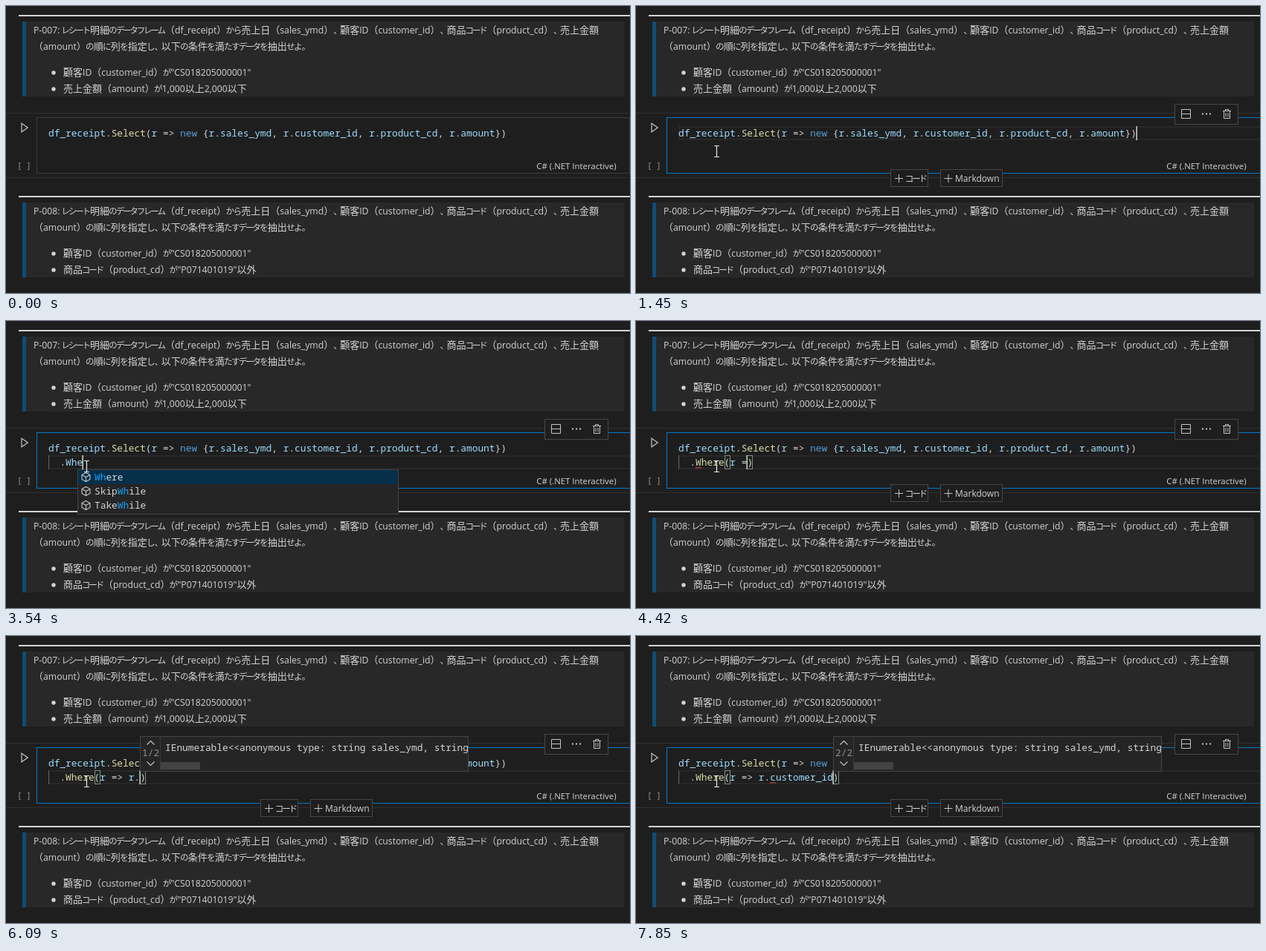
An HTML page that plays this animation: 839 px wide and 387 px high, repeating every 8000 ms.

```html
<!DOCTYPE html>
<html lang="ja">
<head>
<meta charset="utf-8">
<style>
html, body { margin: 0; width: 100%; height: 100%; overflow: hidden; background: #1e1e1e; }
#stage { display: block; }
text { white-space: pre; }
.ui { font: 12.22px "Open Sans", "Noto Sans", sans-serif; fill: #d4d4d4; }
.kanji { font: 13px "Noto Sans CJK JP", "Noto Sans CJK", sans-serif; fill: #d4d4d4; }
.kana { font: 11.6px "Noto Sans CJK JP", "Noto Sans CJK", sans-serif; fill: #d4d4d4; }
.code { font: 500 12.833px "Noto Sans Mono", monospace; fill: #d4d4d4; }
.id { fill: #9cdcfe; }
.fn { fill: #dcdcaa; }
.kw { fill: #569cd6; }
.hit { fill: #18a3ff; }
.icon { fill: none; stroke: #c5c5c5; }
.box { fill: #252526; stroke: #454545; }
.btn { fill: #1e1e1e; stroke: #474747; }
</style>
</head>
<body>
<svg id="stage" width="839" height="387" viewBox="0 0 839 387">
  <g id="notes"></g>
  <path d="M0 144.5H839M0 231.5H839" stroke="#303030"/>
  <rect id="editor" x="41.5" y="150.5" height="75" fill="#1e1e1e"/>
  <path class="icon" d="M21 158.2L29.3 164L21 169.8Z" stroke-width="1.2"/>
  <text class="code" x="15" y="219" style="font-size:10.5px;fill:#9a9a9a">[ ]</text>
  <text class="ui" x="820.5" y="220" text-anchor="end" style="font-size:11.4px">C# (.NET Interactive)</text>
  <rect id="row" x="58" width="790" height="17" fill="none" stroke="#282828" stroke-width="2"/>
  <path id="guide" d="M57.5 181V200" stroke="#606060"/>
  <g id="brackets" fill="#1b251b" stroke="#888"></g>
  <text id="line1" class="code" x="57" y="176"></text>
  <text id="line2" class="code" x="57" y="195"></text>
  <path id="wave" fill="none" stroke="#f14c4c" d="M0 199q1 -2.4 2 -1.2t2 0t2 0t2 0"/>
  <rect id="caret" width="1.6" height="19" fill="#c8c8c6"/>
  <g id="insert">
    <rect class="btn" x="342.5" y="220.5" width="50" height="23"/>
    <rect class="btn" x="409.5" y="220.5" width="83" height="23"/>
    <path class="icon" d="M348 232.5H359M353.5 227V238M414.5 232.5H425.5M420 227V238"/>
    <text class="ui" x="429" y="237" style="font-size:12px">Markdown</text>
  </g>
  <g id="tools">
    <rect id="toolBox" class="btn" y="132.5" height="27"/>
    <path id="split" class="icon" d="M733.5 139.5H745.5V151.5H733.5ZM733.5 145.5H745.5"/>
    <path d="M761 145.5h2m3 0h2m3 0h2" stroke="#c5c5c5" stroke-width="2"/>
    <path id="trash" class="icon" d="M789 141.5H800M792.5 141V139.5H796.5V141M790.5 142V151.5H798.5V142M793 144V149.5M796 144V149.5"/>
  </g>
  <g id="list"></g>
  <svg id="tip" y="135" width="442" height="48">
    <rect class="box" x=".5" y=".5" width="441" height="47"/>
    <path d="M27.5 1V47" stroke="#3a3a3a"/>
    <path class="icon" d="M9.5 11.5L14.5 6.5L19.5 11.5M9.5 34.5L14.5 39.5L19.5 34.5" stroke-width="1.2"/>
    <text id="count" class="code" x="3" y="27" style="fill:#909090"></text>
    <text class="code" x="34" y="20">IEnumerable&lt;&lt;anonymous type: string sales_ymd, string</text>
    <rect id="scroll" x="28" y="35" width="53" height="10" fill="#434343"/>
  </svg>
  <g id="mouse">
    <path id="beam" fill="none" stroke="#e8e8e8" stroke-width="1.2" d="M-3.5 -7.5H-1Q0 -7.5 0 -6.5Q0 -7.5 1 -7.5H3.5M0 -6.5V6.5M-3.5 7.5H-1Q0 7.5 0 6.5Q0 7.5 1 7.5H3.5"/>
    <path id="arrow" fill="#fff" stroke="#000" stroke-width=".8" d="M0 0V15L3.5 12L6 17.5L8 16.6L5.7 11.3H10.5Z"/>
  </g>
</svg>
<script>
const LOOP = 8000, CH = 7.7, LEFT = 57;
const $ = id => document.getElementById(id);
const colX = n => LEFT + CH * n;

function add(parent, tag, attrs, text) {
  const el = document.createElementNS("http://www.w3.org/2000/svg", tag);
  for (const k in attrs) el.setAttribute(k, attrs[k]);
  if (text) el.textContent = text;
  return parent.appendChild(el);
}
const show = (id, on) => $(id).setAttribute("display", on ? "inline" : "none");

// Mixed Japanese and Latin line: kanji on a 13px pitch, kana narrower.
function japanese(parent, x, y, line) {
  for (const run of line.match(/[ -~]+|[ぁ-んァ-ヶー、。]+|[^ -~ぁ-んァ-ヶー、。]+/g)) {
    if (/[ -~]/.test(run)) {
      x += add(parent, "text", { class: "ui", x, y }, run).getComputedTextLength();
      continue;
    }
    const kana = /[ぁ-んァ-ヶー、。]/.test(run), xs = [];
    for (const c of run) {
      const w = !kana ? 13 : /[ァ-ヶー]/.test(c) ? 9.3 : /[、。]/.test(c) ? 9 : 10;
      xs.push(kana && !/[、。]/.test(c) ? x + (w - 11.6) / 2 : x);
      x += w;
    }
    add(parent, "text", { class: kana ? "kana" : "kanji", x: xs.join(" "), y }, run);
  }
}

function note(y, id, rule1, rule2) {
  const g = add($("notes"), "g", { transform: `translate(0 ${y})` });
  add(g, "rect", { x: 17, y: 12, width: 822, height: 2, fill: "#d4d4d4" });
  add(g, "rect", { x: 22, y: 21, width: 809, height: 101, fill: "#282828" });
  add(g, "rect", { x: 22, y: 21, width: 5, height: 101, fill: "#0f4c75" });
  japanese(g, 37, 36.5, id + ": レシート明細のデータフレーム（df_receipt）から売上日（sales_ymd）、顧客ID（customer_id）、商品コード（product_cd）、売上金額");
  japanese(g, 37, 58.5, "（amount）の順に列を指定し、以下の条件を満たすデータを抽出せよ。");
  [rule1, rule2].forEach((rule, i) => {
    add(g, "circle", { cx: 64, cy: 90 + 22 * i, r: 2.7, fill: "#d4d4d4" });
    japanese(g, 77, 94 + 22 * i, rule);
  });
}

function paint(el, code) {
  el.textContent = "";
  for (const part of code.match(/\w+(?=\()|\w+|\W+/g) || [])
    add(el, "tspan", { class: part === "new" ? "kw" : /Select|Where/.test(part) ? "fn" : /\w/.test(part) ? "id" : "" }, part);
}

// Typed second line: [time, text left of the caret]; a bracket pair closes itself.
const typed = [
  [0, ""], [1780, "  "], [2530, "  ."], [2750, "  .W"], [3200, "  .Wh"], [3430, "  .Whe"],
  [3545, "  .Wher"], [3660, "  .Where"], [3880, "  .Where("], [4110, "  .Where(r"],
  [4220, "  .Where(r "], [4420, "  .Where(r ="], [4650, "  .Where(r =>"], [4750, "  .Where(r => "],
  [5770, "  .Where(r => r"], [6090, "  .Where(r => r."], [6970, "  .Where(r => r.c"],
  [7190, "  .Where(r => r.customer_id"]
];
// Suggestions: [time, column, items]; stars mark the matched letters, # a property.
const lists = [
  [0], [3315, 5, "*Wh*ere Skip*Wh*ile Take*Wh*ile"], [3660, 8, "*Where*"], [3880],
  [6310, 16, "#amount #customer_id Equals GetHashCode GetType #product_cd #sales_ymd ToString"],
  [6970, 17, "#*c*ustomer_id GetHash*C*ode #product_*c*d"], [7630]
];
const tips = [[0], [4970, 14], [5770, 15], [6090, 16], [6970, 17], [7740, 27]];
const blinks = [[2320, 2530], [5430, 5770], [6520, 6970]];
const moves = [
  [200, 430, 366], [313, 345, 300], [426, 250, 222], [539, 185, 178], [650, 141.5, 151.5],
  [765, 112, 160], [880, 92, 172], [990, 83, 177], [1110, 95, 186], [1220, 108.5, 196]
];
const at = (steps, t) => steps.filter(s => s[0] <= t).pop();
const within = (t, a, b) => t >= a && t < b;

let listKey;
function drawList(step) {
  if (step === listKey) return;
  listKey = step;
  const g = $("list");
  g.textContent = "";
  if (!step[2]) return;
  const x = Math.round(colX(step[1])), items = step[2].split(" ");
  add(g, "rect", { class: "box", x: x + .5, y: 200.5, width: 431, height: 19 * items.length + 3 });
  items.forEach((item, i) => {
    const y = 201 + 19 * i, prop = item[0] === "#";
    if (!i) add(g, "rect", { x: x + 1, y, width: 430, height: 19, fill: "#062f4a" });
    add(g, "path", {
      class: "icon", transform: `translate(${x + 11.5} ${y + 9.5})`, "stroke-width": 1.1,
      d: prop ? "M-5.5 4L0 -1.5Q-1 -5 3.5 -5.5L1.8 -3.2L3.6 -1.4L5.8 -3Q5.5 1.5 1.6 .6L-4 5.8Q-6 6.2 -5.5 4Z"
              : "M0 -6L5.5 -3V3L0 6L-5.5 3V-3ZM-5.5 -3L0 0L5.5 -3M0 0V6"
    });
    const label = add(g, "text", { class: "code", x: x + 23, y: y + 14 });
    item.replace("#", "").split("*").forEach((s, n) => add(label, "tspan", { class: n % 2 ? "hit" : "" }, s));
  });
}

let shown;
function render(t) {
  const left = at(typed, t)[1], focus = t >= 1330, newline = t >= 1780;
  const open = left.includes("("), full = left + (open ? ")" : "");
  if (full !== shown) {
    shown = full;
    paint($("line2"), full);
    $("brackets").textContent = "";
    if (open) for (const c of [8, left.length])
      add($("brackets"), "rect", { x: Math.round(colX(c)) + .5, y: 181.5, width: 7, height: 18 });
  }
  // The focus ring runs past the right edge of the stage.
  $("editor").setAttribute("stroke", focus ? "#007acc" : "#3a3a3a");
  $("editor").setAttribute("width", focus ? 800 : 797);
  show("row", focus);
  $("row").setAttribute("y", newline ? 182 : 163);
  show("guide", t >= 2530);

  show("caret", focus && !blinks.some(b => within(t, ...b)));
  $("caret").setAttribute("x", Math.round(colX(newline ? left.length : 80)) - .6);
  $("caret").setAttribute("y", newline ? 181 : 162);

  const late = t >= 7850;
  show("wave", within(t, 3990, 5310) || late);
  $("wave").setAttribute("transform", `translate(${colX(late ? 16 : 3)} 0)`);

  const hover = t >= 426;
  show("insert", hover);
  show("tools", hover);
  show("split", focus);
  $("toolBox").setAttribute("x", focus ? 724.5 : 752.5);
  $("toolBox").setAttribute("width", focus ? 85 : 57);

  drawList(at(lists, t));
  const tip = at(tips, t)[1];
  show("tip", tip);
  if (tip) $("tip").setAttribute("x", Math.round(colX(tip)));
  show("scroll", !within(t, 6970, 7740));
  $("count").textContent = t >= 7410 ? "2/2" : "1/2";

  const m = at(moves, t);
  show("mouse", m);
  if (m) {
    $("mouse").setAttribute("transform", `translate(${m[1]} ${m[2]})`);
    show("beam", m[2] < 226);
    show("arrow", m[2] >= 226);
  }
}

note(0, "P-007", '顧客ID（customer_id）が"CS018205000001"', "売上金額（amount）が1,000以上2,000以下");
note(244, "P-008", '顧客ID（customer_id）が"CS018205000001"', '商品コード（product_cd）が"P071401019"以外');
japanese($("insert"), 363, 237, "コード");
paint($("line1"), "df_receipt.Select(r => new {r.sales_ymd, r.customer_id, r.product_cd, r.amount})");

const start = performance.now();
function tick() {
  render((performance.now() - start) % LOOP);
  requestAnimationFrame(tick);
}
render(0);
requestAnimationFrame(tick);
</script>
</body>
</html>
```
